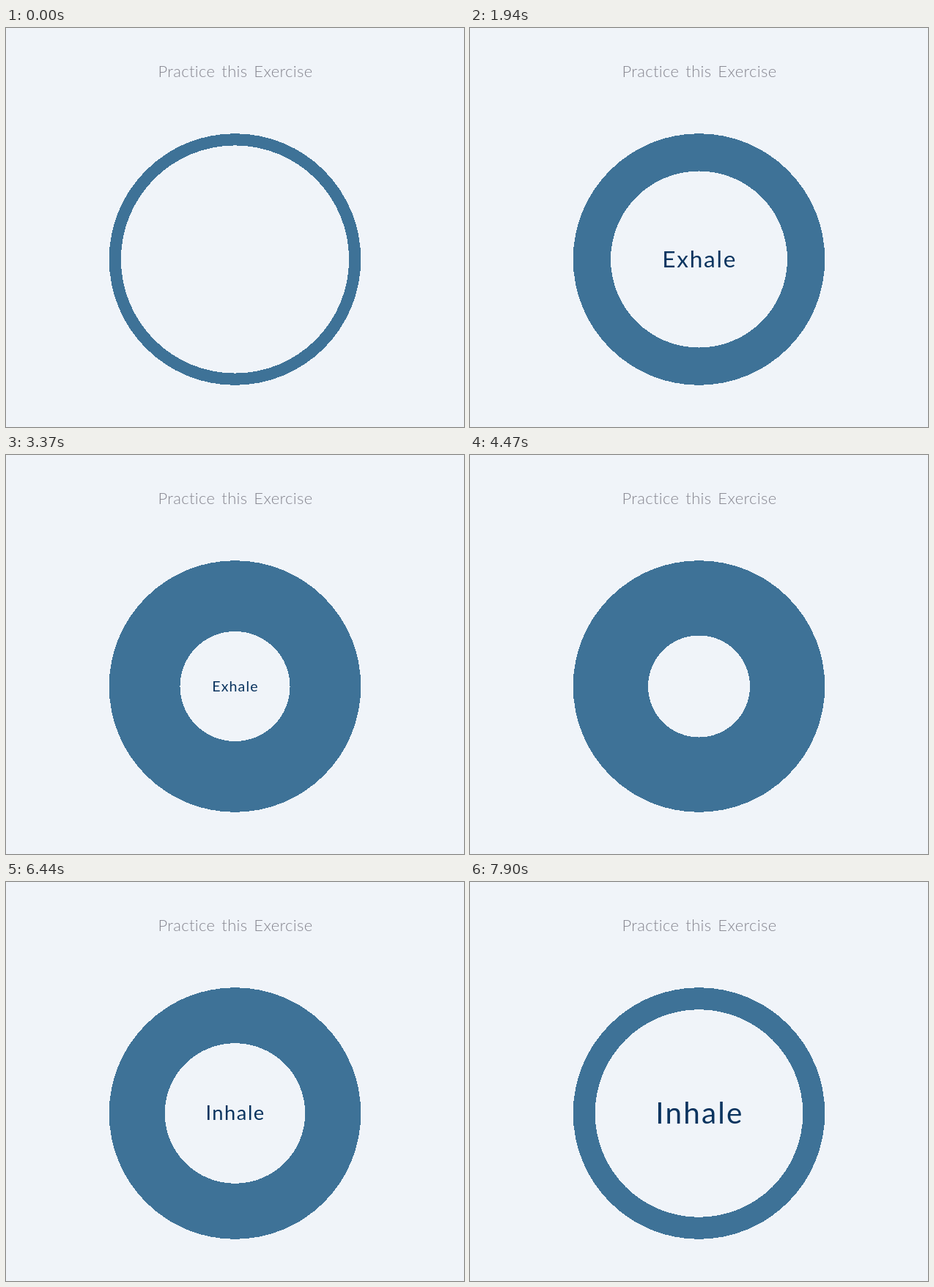
These frames come from a looping animation (625x545 px, 8000 ms). An HTML page:

```html
<!DOCTYPE html>
<html lang="en">
<head>
<meta charset="utf-8">
<title>Breathing exercise</title>
<style>
  html, body { margin: 0; width: 100%; height: 100%; overflow: hidden; background: #f0f4f9; }
  svg { display: block; }
  circle { shape-rendering: crispEdges; }
  text { font-family: Lato, sans-serif; text-anchor: middle; }
  .title { font-size: 22px; font-weight: 300; word-spacing: 2.5px; letter-spacing: .35px; fill: #85858f; }
  .word { letter-spacing: .055em; fill: #0a345f; }
</style>
</head>
<body>
<svg width="625" height="545" viewBox="0 0 625 545">
  <text class="title" x="313" y="66.5">Practice this Exercise</text>
  <circle cx="312.5" cy="316" r="171.8" fill="#3e7297"/>
  <g id="core">
    <circle r="100" fill="#f0f4f9"/>
    <text class="word" id="exhale" x=".6" y="9.2" font-size="26.2">Exhale</text>
    <text class="word" id="inhale" x=".6" y="9.8" font-size="28.5">Inhale</text>
  </g>
</svg>
<script>
const LOOP = 8000, MAX_R = 155.6, MIN_R = 69.5;
const [core, exhale, inhale] = ['core', 'exhale', 'inhale'].map(id => document.getElementById(id));

// Progress 0..1 between two times
const ramp = (t, from, to) => Math.min(1, Math.max(0, (t - from) / (to - from)));
const easeSine = x => (1 - Math.cos(Math.PI * x)) / 2;

function draw(now) {
  const t = now % LOOP;
  const openness = 1 - easeSine(ramp(t, 350, 3960)) + easeSine(ramp(t, 4950, 8950));
  const radius = MIN_R + (MAX_R - MIN_R) * openness;
  core.setAttribute('transform', `translate(312.5 316) scale(${radius / 100})`);
  exhale.setAttribute('opacity', ramp(t, 200, 600) - ramp(t, 3400, 3900));
  inhale.setAttribute('opacity', ramp(t, 4950, 5350));
  requestAnimationFrame(draw);
}
draw(performance.now());
</script>
</body>
</html>
```
